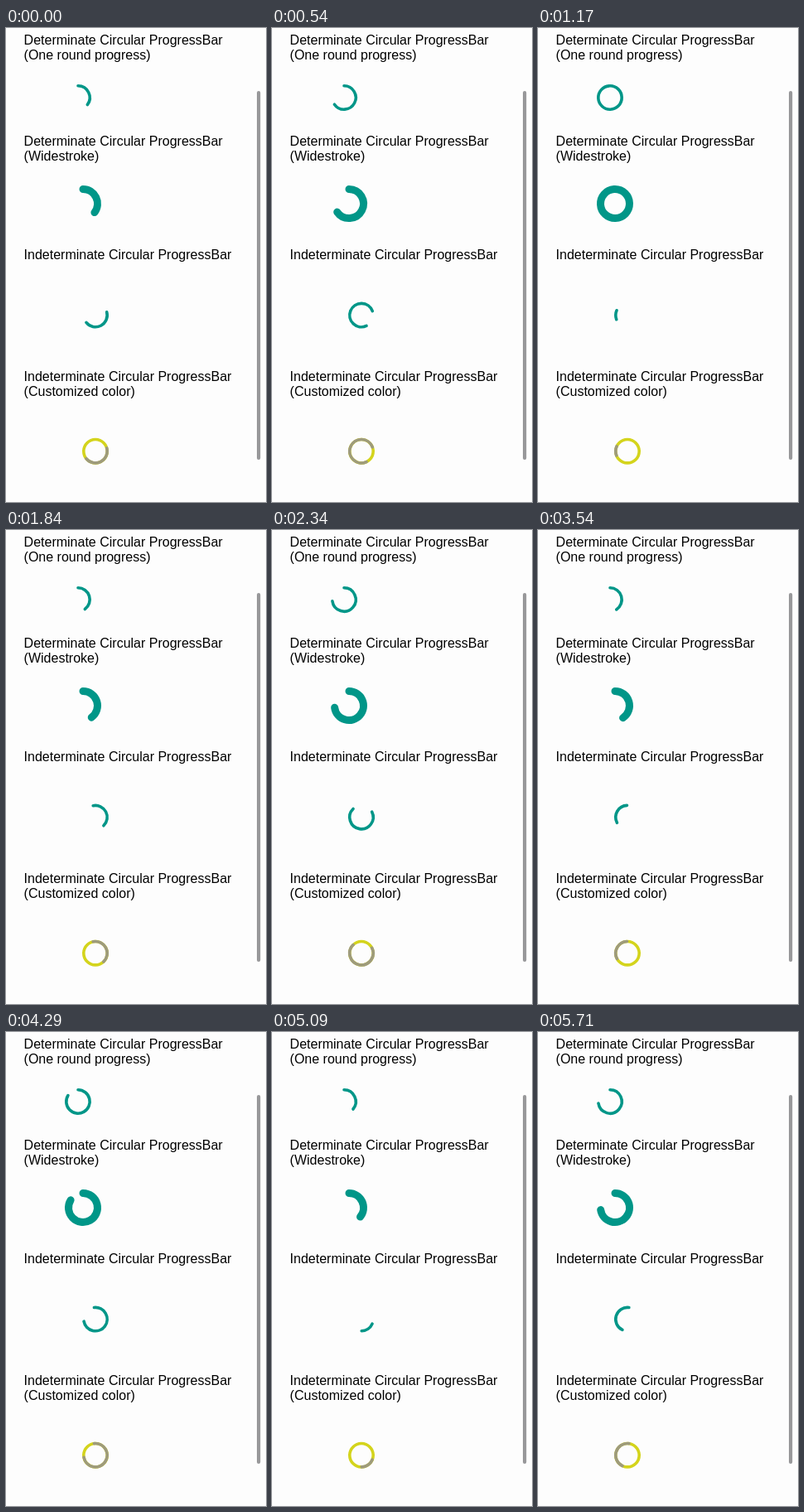
These frames come from a looping animation (314x572 px, 5.75 s). An HTML page:

```html
<!DOCTYPE html>
<html lang="en">
<head>
<meta charset="utf-8">
<title>Circular progress bars</title>
<style>
  html, body { margin: 0; width: 100%; height: 100%; overflow: hidden; background: #fdfdfd; }
  svg { display: block; }
  text { font: 16px "Liberation Sans", Arial, sans-serif; fill: #000; }
  path, circle { fill: none; stroke-linecap: round; stroke-width: 3.6; }
  .teal { stroke: #009688; }
  .gray { stroke: #9e9b7c; }
  .track { stroke: #d4d41c; }
  .wide { stroke-width: 9; }
</style>
</head>
<body>
<svg width="314" height="572" viewBox="0 0 314 572">
  <text x="21.6" y="20">Determinate Circular ProgressBar</text>
  <text x="21.6" y="38.4">(One round progress)</text>
  <text x="21.6" y="141.7">Determinate Circular ProgressBar</text>
  <text x="21.6" y="160">(Widestroke)</text>
  <text x="21.6" y="279.3">Indeterminate Circular ProgressBar</text>
  <text x="21.6" y="425.5">Indeterminate Circular ProgressBar</text>
  <text x="21.6" y="444">(Customized color)</text>
  <rect x="303" y="76" width="4.2" height="445" rx="2.1" fill="#98989a"/>
  <path id="round" class="teal"/>
  <path id="wide" class="teal wide"/>
  <path id="spin" class="teal"/>
  <circle class="track" cx="108" cy="510.7" r="14.2"/>
  <path id="custom" class="gray"/>
</svg>
<script>
const LOOP = 5750;
const TAU = 2 * Math.PI;

// Steady filling with a slight sway in speed, in turns
const progress = s => (.323 + .592 * s + .03 * Math.cos(TAU * s / 2.7)) % 1;

// Each turn slows down halfway and speeds up at its ends
function sweep(s) {
  const turns = .475 + .528 * s;
  return (turns + .04 * Math.cos(TAU * turns)) % 1;
}

function arc(id, cx, cy, r, start, turns) {
  const point = turn => `${cx + r * Math.sin(TAU * turn)} ${cy - r * Math.cos(TAU * turn)}`;
  const span = Math.max(.0002, turns);
  const half = `A${r} ${r} 0 0 1 `;
  document.getElementById(id).setAttribute("d",
    `M${point(start)}${half}${point(start + span / 2)}${half}${point(start + span)}`);
}

function draw(ms) {
  const s = (ms % LOOP) / 1000;
  const done = progress(s);
  arc("round", 87, 84, 14.2, 0, done);
  arc("wide", 93, 212, 17.5, 0, done);

  const start = .206 + .414 * s;
  const span = sweep(s);
  arc("spin", 108, 346.6, 14.2, start, span);
  arc("custom", 108, 510.7, 14.2, start, span);
}

const begin = performance.now();
function tick() {
  draw(performance.now() - begin);
  requestAnimationFrame(tick);
}
tick();
</script>
</body>
</html>
```
